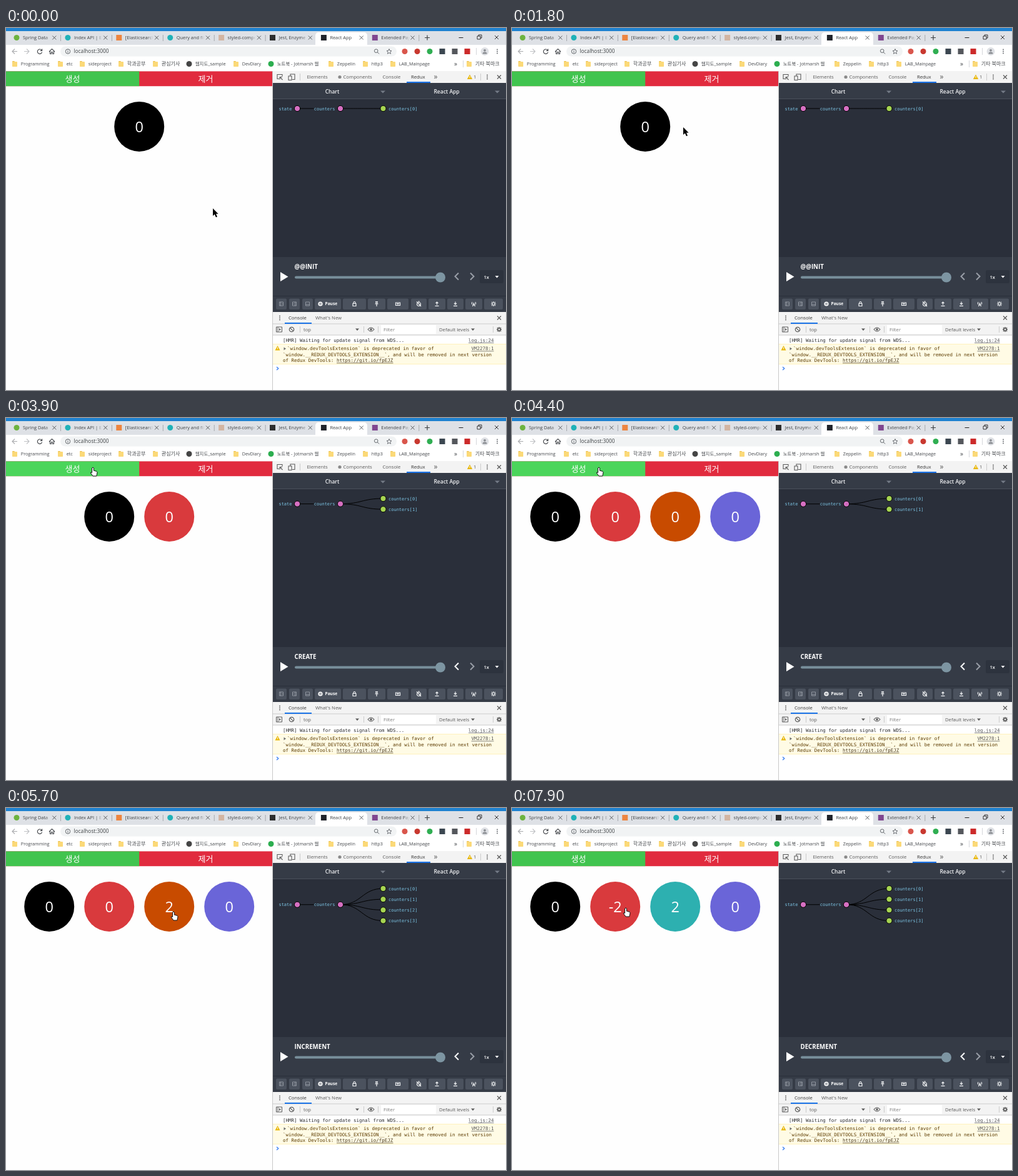
An HTML page with a canvas for the animation above (8 s loop, 800 by 580 pixels).

```html
<!DOCTYPE html>
<html lang="ko">
<head>
<meta charset="utf-8">
<title>Counter demo</title>
<style>
  html, body { margin: 0; width: 100%; height: 100%; overflow: hidden; background: #fff; }
  canvas { display: block; }
</style>
</head>
<body>
<canvas id="stage" width="800" height="580"></canvas>
<script>
const ctx = document.getElementById('stage').getContext('2d');
const LOOP = 8000, STEP = 100;
const SANS = '"Open Sans", "Noto Sans CJK KR", "Noto Sans CJK", sans-serif';
const MONO = '"DejaVu Sans Mono", monospace';

// ---- drawing helpers ----
function rect(x, y, w, h, color) {
  ctx.fillStyle = color;
  ctx.fillRect(x, y, w, h);
}
function round(x, y, w, h, r, color) {
  ctx.fillStyle = color;
  ctx.beginPath();
  ctx.roundRect(x, y, w, h, r);
  ctx.fill();
}
function disc(x, y, r, color, outline) {
  ctx.beginPath();
  ctx.arc(x, y, Math.max(r, 0), 0, 7);
  ctx.fillStyle = color;
  ctx.fill();
  if (outline) { ctx.strokeStyle = outline; ctx.lineWidth = 1; ctx.stroke(); }
}
// y is the middle of the capital letters
function text(str, x, y, size, color, { weight = 400, family = SANS, align = 'left' } = {}) {
  ctx.font = `${weight} ${size}px ${family}`;
  ctx.textAlign = align;
  ctx.fillStyle = color;
  ctx.fillText(str, x, y + 0.36 * size);
}
const mono = (str, x, y, color, align) => text(str, x, y, 7.5, color, { family: MONO, align });
function icon(d, x, y, { stroke, fill, width = 1 }) {
  const path = new Path2D(d);
  ctx.save();
  ctx.translate(x, y);
  if (fill) { ctx.fillStyle = fill; ctx.fill(path); }
  if (stroke) { ctx.strokeStyle = stroke; ctx.lineWidth = width; ctx.stroke(path); }
  ctx.restore();
}
const line = (d, x, y, stroke, width) => icon(d, x, y, { stroke, width });
const solid = (d, x, y, fill) => icon(d, x, y, { fill });

const CROSS = 'M-3-3L3 3M3-3L-3 3';
const DOWN = 'M-3-1.5H3L0 2Z';
const RING = 'M3.7 0A3.7 3.7 0 1 1-3.7 0A3.7 3.7 0 1 1 3.7 0';
const GEAR = 'M2 0A2 2 0 1 1-2 0A2 2 0 1 1 2 0M2-2L3-3M-2-2L-3-3M2 2L3 3M-2 2L-3 3M0-2.6V-4M0 2.6V4M2.6 0H4M-2.6 0H-4';
const HAND = 'M-1.4 1Q0-.8 1.4 1V5.2L6 6.4Q7.2 7 6.9 9L5.8 14H0L-3.6 9Q-4 7.2-1.4 8.5Z';
const ARROW = 'M0 0V12L2.8 9.5L4.9 14.3L7 13.4L5 8.8H8.6Z';
const dots = (x, y, color) => [-3, 0, 3].forEach(dy => disc(x, y + dy, 0.9, color));
function folder(x, y) {
  round(x - 4, y - 4.5, 4, 3, 1, '#e9bd4c');
  round(x - 4, y - 3.5, 8, 8, 0.8, '#fbd978');
}

// ---- browser frame ----
const TABS = [
  ['Spring Data', '#6db33f', true], ['Index API | E', '#20b2b8', true],
  ['[Elasticsearch', '#ed8540'], ['Query and filter', '#20b2b8', true],
  ['styled-components', '#d3b5a2'], ['Jest, Enzyme', '#2d2d2d'],
  ['React App', '#20232a'], ['Extended Page', '#80468f']
];
const BOOKMARKS = [
  [14, 'Programming'], [87, 'etc'], [122, 'sideproject'], [184, '학과공부', 8], [239, '관심기사', 8],
  [293, '웹지도_sample', 7.4, '#454545'], [368, 'DevDiary'], [424, '노트북 - Jotmarsh 웹', 7.4, '#2dae50'],
  [520, 'Zeppelin'], [575, 'http3'], [619, 'LAB_Mainpage'], [741, '기타 북마크', 8]
];
const EXTENSIONS = ['#d9564c', '#c8382f', '#2fae52', '#3b4650', '#54575c', '#cc2a2a'];

function drawTabs() {
  rect(0, 0, 800, 5, '#1f82d0');
  rect(0, 5, 800, 22, '#dee1e6');
  round(495, 7, 83, 22, [5, 5, 0, 0], '#fff');
  TABS.forEach(([title, color, circular], i) => {
    const x = 17 + i * 81.9;
    if (circular) disc(x, 15.5, 4.5, color);
    else rect(x - 4.5, 11, 9, 9, color);
    const fade = ctx.createLinearGradient(x + 46, 0, x + 55, 0);
    fade.addColorStop(0, '#3c4043');
    fade.addColorStop(1, '#3c404300');
    text(title, x + 10, 15.5, 7.4, fade);
    line(CROSS, x + 60.3, 15.5, '#4a4d51', 0.9);
    if (i < 5 || i === 7) rect(x + 70, 11, 1, 10, '#a5a8ad');
  });
  line('M-4 0H4M0-4V4', 674, 15.5, '#3c4043', 1.2);
  line('M-3.5 0H3.5', 728, 15.5, '#222');
  line('M-3-1H2V4H-3ZM-1-1V-3H4V2H2', 757, 14, '#222', 0.9);
  line(CROSS, 785, 15, '#222', 0.9);
}

function drawToolbar() {
  rect(0, 27, 800, 42, '#fff');
  line('M4 0H-4M0-4L-4 0L0 4', 14, 37.5, '#a9abae', 1.1);
  line('M-4 0H4M0-4L4 0L0 4', 33, 37.5, '#c0c2c5', 1.1);
  line('M3-2A3.7 3.7 0 1 0 3.6 1.2M3.6-4V-1.2H.8', 54, 37.5, '#484b4f', 1.2);
  line('M-4.5 .5L0-4L4.5 .5M-3-.5V4H-1V1H1V4H3V-.5', 73.5, 37.5, '#484b4f', 1.1);
  round(87, 29.5, 538, 16, 8, '#f1f3f4');
  line(RING + 'M0-.5V2M0-2.2V-1.2', 99, 37.5, '#5f6368', 1);
  text('localhost:3000', 108.5, 37.5, 8.3, '#3c4043');
  line('M2-.8A2.8 2.8 0 1 1-3.6-.8A2.8 2.8 0 1 1 2-.8M1.2 1.2L4 4', 593, 37.5, '#5f6368', 1);
  line('M0-4L1.2-1.2L4-1L1.8 .9L2.5 3.8L0 2.2L-2.5 3.8L-1.8 .9L-4-1L-1.2-1.2Z', 613, 37.5, '#5f6368', 0.9);
  EXTENSIONS.forEach((color, i) => {
    const x = 638 + i * 20;
    if (i < 3) disc(x, 37.5, 4.5, color);
    else rect(x - 4.5, 33, 9, 9, color);
  });
  rect(752, 32, 1, 11, '#d5d7da');
  disc(766, 37.5, 6.5, '#dfe1e5');
  disc(766, 35.8, 1.9, '#8a8d92');
  round(762.5, 38.5, 7, 3, [3, 3, 0, 0], '#8a8d92');
  dots(786, 37.5, '#5f6368');

  for (const [x, label, size = 7.2, color] of BOOKMARKS) {
    if (color) disc(x, 57.5, 4.5, color);
    else folder(x, 57.5);
    text(label, x + 9.8, 57.5, size, '#45484c');
  }
  text('»', 717, 57, 10, '#45484c');
  rect(731, 52, 1, 11, '#d5d7da');
}

// ---- developer tools ----
function drawToolTabs() {
  rect(426, 69, 374, 511, '#fff');
  rect(427, 69, 373, 19, '#f3f3f3');
  line('M4-1V-4H-4V3H-1M0 0L4.5 4.5M0 0V4M0 0H4', 438, 78.5, '#5a5a5a', 1.1);
  line('M-2-1V-4.5H5V4H1M-5-1.5H0V5H-5Z', 457, 78.5, '#5a5a5a', 1.1);
  rect(470, 73, 1, 11, '#ccc');
  text('Elements', 481.5, 78.5, 7.7, '#5a5a5a');
  disc(534, 78.5, 2.6, '#8a8a8a');
  text('Components', 539.5, 78.5, 7.7, '#5a5a5a');
  text('Console', 602.5, 78.5, 7.7, '#5a5a5a');
  text('Redux', 648, 78.5, 7.7, '#333');
  rect(641, 86, 38, 2, '#1a73e8');
  text('»', 684.5, 78, 12, '#5a5a5a');
  solid('M0-4L4.2 3.5H-4.2Z', 742, 78.5, '#e8b70c');
  rect(741.6, 77, 0.9, 3, '#fff');
  text('1', 748, 78.5, 7.7, '#5a5a5a');
  rect(759, 73, 1, 11, '#ccc');
  dots(770, 78.5, '#5a5a5a');
  line(CROSS, 789, 78.5, '#5a5a5a', 1.2);
}

function drawReduxPanel(action, canGoBack) {
  rect(427, 88, 373, 367, '#2a2f3a');
  rect(427, 88, 373, 26, '#353b46');
  rect(427, 113, 373, 1, '#4a515c');
  const heading = { weight: 600, align: 'center' };
  text('Chart', 522, 102, 8.5, '#f2f3f5', heading);
  text('React App', 705, 102, 8.5, '#f2f3f5', heading);
  solid('M-4-1.5H4L0 2.5Z', 603, 102, '#747b86');
  solid('M-4-1.5H4L0 2.5Z', 786, 102, '#747b86');

  rect(427, 367, 373, 88, '#353b46');
  solid('M-6-7.5L6.5 0L-6 7.5Z', 445, 398.5, '#fff');
  text(action, 461.5, 383, 9.7, '#fff', { weight: 700 });
  round(462, 397.5, 233, 4, 2, '#788f9b');
  disc(695, 399.5, 8, '#7d95a2');
  line('M3-5.5L-2.5 0L3 5.5', 721, 398, canGoBack ? '#fff' : '#9a9fa8', 2);
  line('M-3-5.5L2.5 0L-3 5.5', 746, 398, '#9a9fa8', 2);
  round(758, 388, 38, 21, 2, '#2d333e');
  text('1x', 764.5, 399, 7.5, '#fff', { weight: 600 });
  solid(DOWN, 785.5, 398.5, '#fff');

  rect(427, 429, 373, 1, '#2a2f3a');
  drawButtons();
}

const BUTTONS = [
  [432, 17, 'M-3-3H3V3H-3ZM-1-3V3M1 0H3'], [453, 17, 'M-3-3H3V3H-3ZM1-3V3M-3 0H-1'],
  [474, 17, 'M-3-3H3V3H-3ZM-3 1H3'], [494, 42, ''],
  [539, 37, 'M-2.5-.5H2.5V3.5H-2.5ZM-1.5-.5V-2.5Q0-4.5 1.5-2.5V-.5'],
  [579, 28, 'M-2-3.5H2M-1-3.5V0M1-3.5V0M-2.5 0H2.5M0 0V4'],
  [610, 34, 'M-3.5-2H3.5V2.5H-3.5ZM-2-.5H2M-1.5 1H1.5'],
  [648, 25, 'M3 .5A3 3 0 1 1-3 .5A3 3 0 1 1 3 .5M-1-3.8H1M-3.5-3.5L3.5 4'],
  [676, 27, 'M0 1.5V-3M-2-1L0-3L2-1M-3 3.3H3'], [706, 26, 'M0-3.5V1M-2-1L0 1L2-1M-3 3.3H3'],
  [735, 27, 'M-2 4L0-1L2 4M-2.5-3Q-4-1-2.5 1M2.5-3Q4-1 2.5 1M-1.2 2H1.2'], [765, 30, GEAR]
];
function drawButtons() {
  for (const [x, w, shape] of BUTTONS) {
    const layoutButton = x < 480;
    round(x, 433.5, w, 17.5, 2, '#4b525e');
    line(shape, x + w / 2, 442, layoutButton ? '#adb2ba' : '#eef0f2', layoutButton ? 0.7 : 1.2);
  }
  disc(503, 442, 3.6, '#fff');
  rect(501.5, 440.3, 1, 3.4, '#4b525e');
  rect(503.5, 440.3, 1, 3.4, '#4b525e');
  text('Pause', 510.5, 442, 6.6, '#fff', { weight: 700 });
}

function drawConsole() {
  rect(427, 455, 373, 37, '#f3f3f3');
  rect(427, 473.5, 373, 1, '#ccc');
  rect(427, 491.5, 373, 1, '#ccc');
  dots(438, 464.5, '#5a5a5a');
  text('Console', 452, 464.5, 7.7, '#333');
  rect(446, 472, 43, 2, '#1a73e8');
  text("What's New", 495, 464.5, 7.7, '#5a5a5a');
  line(CROSS, 789, 464.5, '#5a5a5a', 1.2);

  line('M-4.5-4H4.5V4H-4.5ZM-2-4V4', 437, 483, '#5a5a5a', 1);
  solid('M0-2L3 0L0 2Z', 437, 483, '#5a5a5a');
  line(RING + 'M-2.6-2.6L2.6 2.6', 457, 483, '#5a5a5a', 1.2);
  rect(470, 478, 1, 10, '#ccc');
  text('top', 476, 483, 7.7, '#5a5a5a');
  solid(DOWN, 562, 483, '#5a5a5a');
  rect(572, 478, 1, 10, '#ccc');
  line('M-5 0Q0-6 5 0Q0 6-5 0Z', 584, 483, '#5a5a5a', 1.1);
  disc(584, 483, 1.8, '#5a5a5a');
  rect(595, 478, 1, 10, '#ccc');
  rect(600, 476, 88, 14, '#fff');
  text('Filter', 604, 483.5, 7.7, '#7a7a7a');
  text('Default levels', 693, 483, 7.7, '#5a5a5a');
  solid(DOWN, 747, 483, '#5a5a5a');
  rect(779, 478, 1, 10, '#ccc');
  line(GEAR, 789, 483, '#5a5a5a', 1.5);

  mono('[HMR] Waiting for update signal from WDS...', 443, 500.5, '#303030');
  mono('log.js:24', 780.5, 500.5, '#555', 'right');
  rect(740, 504, 40.5, 0.7, '#555');
  rect(427, 506, 373, 32, '#fffbe5');
  rect(427, 506, 373, 1, '#fff1bd');
  rect(427, 538, 373, 1, '#fff1bd');
  solid('M0-4L4 3.5H-4Z', 434.5, 513, '#e8b70c');
  rect(434, 511.5, 0.9, 3, '#fff');
  solid('M-1.5-2.5L2-.2L-1.5 2.2Z', 446, 514, '#6e6e6e');
  const brown = '#5c3c00';
  mono('`window.devToolsExtension` is deprecated in favor of', 450, 513.5, brown);
  mono('`window.__REDUX_DEVTOOLS_EXTENSION__`, and will be removed in next version', 443, 523, brown);
  mono('of Redux DevTools: ', 443, 532.5, brown);
  mono('https://git.io/fpEJZ', 529, 532.5, '#4a3a20');
  rect(529, 536.5, 90.5, 0.7, '#4a3a20');
  mono('VM2278:1', 780.5, 513.5, '#555', 'right');
  rect(744.5, 517.5, 36, 0.7, '#555');
  line('M-1.5-2.5L1.3 0L-1.5 2.5', 434.5, 545.5, '#367cf1', 1.3);
  rect(426, 69, 1, 511, '#c9c9c9');
}

// ---- app state over time ----
const CENTER_X = 213.2, CENTER_Y = 157.9, RADIUS = 40;
const COLORS = ['#000', '#d93a3d', '#c84b00', '#6a65d8'];
const ACTIONS = [
  [0, '@@INIT'], [2500, 'CREATE'], [4100, 'CREATE'], [4300, 'CREATE'],
  [5300, 'INCREMENT', 2], [5500, 'INCREMENT', 2], [5900, 'SET_COLOR', 2],
  [7000, 'DECREMENT', 1], [7400, 'DECREMENT', 1]
];
function stateAt(t) {
  const counters = [{ value: 0, color: COLORS[0] }];
  let last;
  for (const [start, type, i] of ACTIONS) {
    if (t < start) break;
    last = type;
    if (type === 'CREATE') counters.push({ value: 0, color: COLORS[counters.length] });
    if (type === 'INCREMENT') counters[i].value++;
    if (type === 'DECREMENT') counters[i].value--;
    if (type === 'SET_COLOR') counters[i].color = '#2db0b0';
  }
  counters.forEach((c, i) => c.x = CENTER_X + 96 * (i - (counters.length - 1) / 2));
  return { counters, last };
}

// ---- tree chart ----
const CHART_STARTS = [2650, 4290, 4900], GROW = 750, GAP = 17.2;
function easeCubic(p) {
  p = Math.min(1, Math.max(0, p));
  return p < 0.5 ? 4 * p ** 3 : 1 - 4 * (1 - p) ** 3;
}
function drawChart(t) {
  const grown = [1, ...CHART_STARTS.map(s => easeCubic((t - s) / GROW))];
  const rootY = 129 + GAP / 2 * (grown.reduce((a, b) => a + b) - 1);
  const label = (str, x, y, align) =>
    text(str, x, y, 7, '#7cc4e4', { family: MONO, align });
  const leaves = grown.map((e, i) => {
    const fromY = 129 + GAP / 2 * Math.max(0, i - 1);
    return { e, i, x: 535 + 68.5 * e, y: fromY + (129 + GAP * i - fromY) * e };
  }).filter(leaf => leaf.e > 0);

  line(`M466 ${rootY}H492.5`, 0, 0, '#000', 1);
  for (const { x, y } of leaves) {
    const mid = (535 + x) / 2;
    line(`M535 ${rootY}C${mid} ${rootY} ${mid} ${y} ${x} ${y}`, 0, 0, '#000', 1);
  }
  label('state', 457.5, rootY, 'right');
  label('counters', 526.5, rootY, 'right');
  disc(466, rootY, 4.6, '#d670c2', '#000');
  disc(535, rootY, 4.6, '#d670c2', '#000');
  for (const { e, i, x, y } of leaves) {
    ctx.globalAlpha = e;
    label(`counters[${i}]`, x + 8.5 - 31 * (1 - e), y);
    ctx.globalAlpha = 1;
    disc(x, y, 4.6 * e, '#a6d552', '#000');
  }
}

// ---- pointer ----
const POINTER = [
  [0, 331, 289], [1100, 331, 289], [1800, 274, 159], [2200, 150, 80], [2600, 150, 80],
  [3000, 226, 137], [3300, 226, 137], [3800, 139, 79], [4400, 139, 79], [4800, 300, 173],
  [5100, 268, 166], [5950, 268, 166], [6300, 182, 188], [6700, 182, 160], [LOOP, 182, 160]
];
function pointerAt(t) {
  const next = POINTER.findIndex(key => key[0] > t);
  const [t0, x0, y0] = POINTER[next - 1], [t1, x1, y1] = POINTER[next];
  const p = (t - t0) / (t1 - t0), e = p * p * (3 - 2 * p);
  return { x: x0 + (x1 - x0) * e, y: y0 + (y1 - y0) * e };
}
function drawPointer({ x, y }, overLink) {
  if (overLink) icon(HAND, x, y, { fill: '#fff', stroke: '#111' });
  else solid(ARROW, x, y, '#000');
}

// ---- page ----
function drawApp(counters, pointer) {
  rect(0, 69, 426, 511, '#fefefe');
  const onBar = pointer.y >= 69 && pointer.y < 93 && pointer.x < 426;
  const onCreate = onBar && pointer.x < CENTER_X;
  rect(0, 69.4, 426, 23.8, onBar && !onCreate ? '#f03e50' : '#e12b3e');
  rect(0, 69.4, CENTER_X, 23.8, onCreate ? '#4bd55b' : '#41c44f');
  text('생성', 106.5, 81, 13, '#fff', { align: 'center' });
  text('제거', 319.5, 81, 13, '#fff', { align: 'center' });
  for (const { x, value, color } of counters) {
    disc(x, CENTER_Y, RADIUS, color);
    text(value, x, 158.8, 23.5, '#fff', { align: 'center' });
  }
  return onBar || counters.some(c => Math.hypot(pointer.x - c.x, pointer.y - CENTER_Y) < RADIUS - 0.5);
}

function draw(t) {
  const { counters, last } = stateAt(t), pointer = pointerAt(t);
  drawTabs();
  drawToolbar();
  const overLink = drawApp(counters, pointer);
  drawToolTabs();
  drawReduxPanel(last, counters.length > 1);
  drawChart(t);
  drawConsole();
  drawPointer(pointer, overLink);
}

const begin = performance.now();
function tick() {
  const elapsed = Math.max(0, performance.now() - begin) % LOOP;
  draw(Math.floor(elapsed / STEP) * STEP);
  requestAnimationFrame(tick);
}
tick();
</script>
</body>
</html>
```
